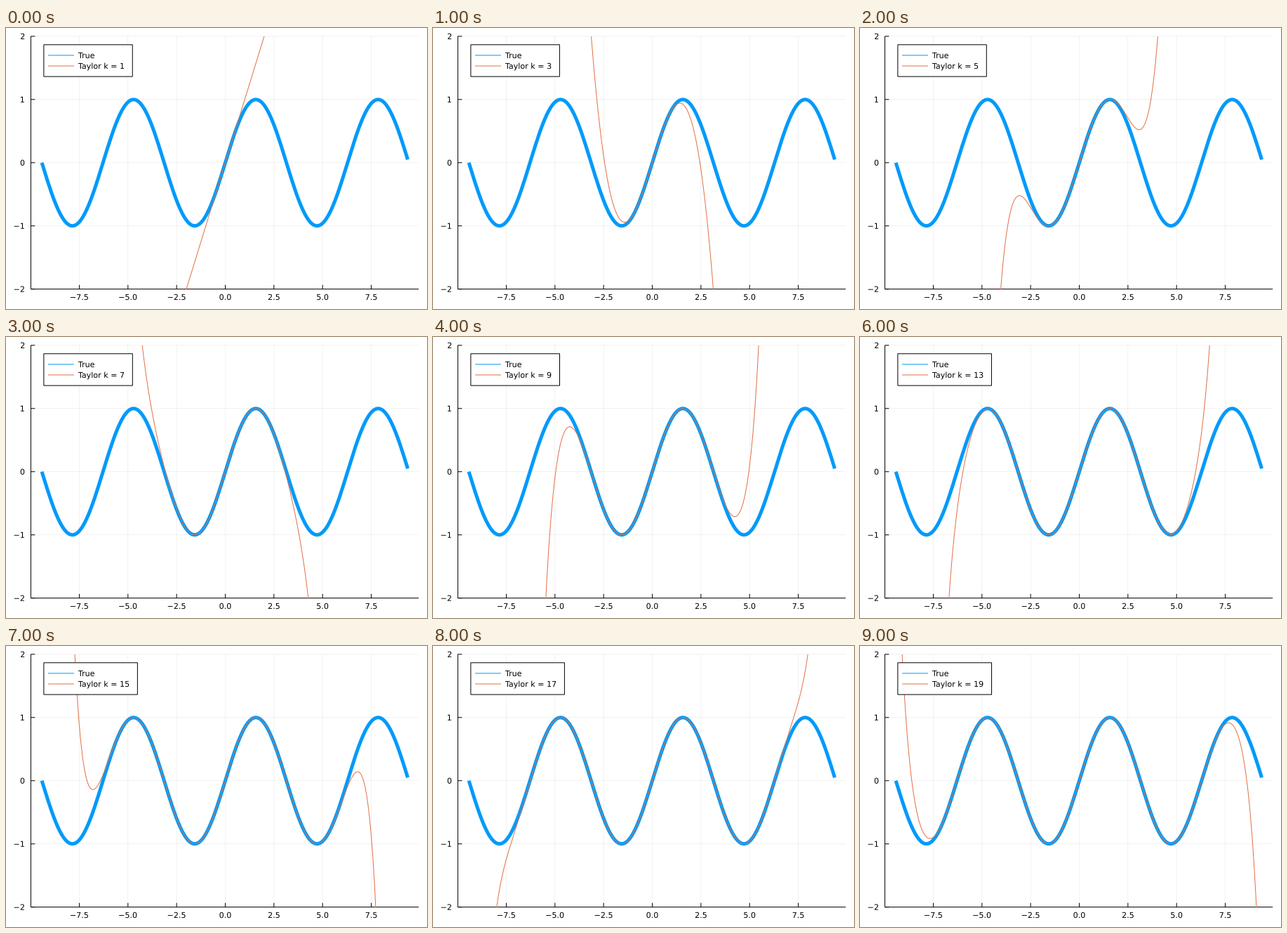
A matplotlib script that plays this animation: 600x400 px, repeating every 9.5 s.

```python
import math

import matplotlib.pyplot as plt
import numpy as np
from matplotlib.animation import FuncAnimation
from matplotlib.patches import PathPatch, Rectangle
from matplotlib.path import Path
from matplotlib.textpath import TextPath

W, H, DPI = 600, 400, 100
LEFT, RIGHT, TOP, BOTTOM = 35.43, 588.19, 11.81, 371.65
FONT = 8 * DPI / 72
CAP = 0.729 * FONT
TICK = 5.9
BLUE, RED = "#009afa", "#e36f47"
BOX_X, BOX_Y, ROW = 53.86, 23.8, 15.1
TEXT_X = 102.9

plt.rcParams["font.family"] = "DejaVu Sans"
fig = plt.figure(figsize=(W / DPI, H / DPI), dpi=DPI, facecolor="white")
ax = fig.add_axes([0, 0, 1, 1])
ax.set(xlim=(0, W), ylim=(H, 0))
ax.axis("off")

x = -3 * math.pi + 0.1 * np.arange(189)
margin = 0.03 * (x[-1] - x[0])
x_min, x_max = x[0] - margin, x[-1] + margin


def px(v):
    return LEFT + (v - x_min) / (x_max - x_min) * (RIGHT - LEFT)


def py(v):
    return TOP + (2 - v) / 4 * (BOTTOM - TOP)


def line(xs, ys, color="black", width=1.0, **kw):
    return ax.plot(xs, ys, color=color, lw=width * 72 / DPI, snap=False,
                   solid_capstyle="butt", solid_joinstyle="round", **kw)[0]


def glyphs(s, x0, baseline, align=0.0):
    """Text outline; align is 0 for left, 0.5 for centre, 1 for right."""
    p = TextPath((0, 0), s, size=FONT)
    box = p.get_extents()
    shift = x0 - align * (box.x0 + box.x1)
    return Path(p.vertices * [1, -1] + [shift, baseline], p.codes)


def text(s, x0, baseline, align=0.0, z=2):
    return ax.add_patch(PathPatch(glyphs(s, x0, baseline, align),
                                  fc="black", lw=0, zorder=z))


def ink(s):
    return TextPath((0, 0), s, size=FONT).get_extents().x1


def caption(k):
    return f"Taylor k = {k}"


def taylor(k):
    return sum((-1) ** (n // 2) * x ** n / math.factorial(n)
               for n in range(1, k + 1, 2))


def signed(s):
    return s.replace("-", "\u2212")


# Grid, ticks and axes
for v in np.arange(-7.5, 8, 2.5):
    gx = px(v)
    line([gx, gx], [TOP, BOTTOM], width=0.5, alpha=0.1, zorder=1)
    line([gx, gx], [BOTTOM, BOTTOM - TICK], zorder=2)
    text(signed(f"{v:.1f}"), gx, 387, 0.5)
for v in range(-2, 3):
    gy = py(v)
    line([LEFT, RIGHT], [gy, gy], width=0.5, alpha=0.1, zorder=1)
    line([LEFT, LEFT + TICK], [gy, gy], zorder=2)
    text(signed(str(v)), 27, gy + CAP / 2, 1)
line([LEFT, LEFT], [TOP, BOTTOM], zorder=2)
line([LEFT, RIGHT], [BOTTOM, BOTTOM], zorder=2)

# Curves
area = Rectangle((LEFT, TOP), RIGHT - LEFT, BOTTOM - TOP, transform=ax.transData)
line(px(x), py(np.sin(x)), BLUE, 5, zorder=3)
approx = line([], [], RED, zorder=4)
approx.set_clip_path(area)

# Legend
frame = ax.add_patch(Rectangle((BOX_X, BOX_Y), 1, 3 * ROW, fc="white", ec="black",
                               lw=72 / DPI, snap=False, zorder=5))
for row, color in enumerate((BLUE, RED), 1):
    y = BOX_Y + row * ROW
    line([60, 97], [y, y], color, zorder=6)
text("True", TEXT_X, BOX_Y + ROW + CAP / 2, z=6)
entry = text(caption(1), TEXT_X, BOX_Y + 2 * ROW + CAP / 2, z=6)


def update(i):
    k = i + 1
    approx.set_data(px(x), py(taylor(k)))
    entry.set_path(glyphs(caption(k), TEXT_X, BOX_Y + 2 * ROW + CAP / 2))
    frame.set_width(180.25 - BOX_X + ink(caption(k)) - ink(caption(1)))
    return approx, entry, frame


anim = FuncAnimation(fig, update, frames=19, interval=500, repeat=True)
plt.show()
```
